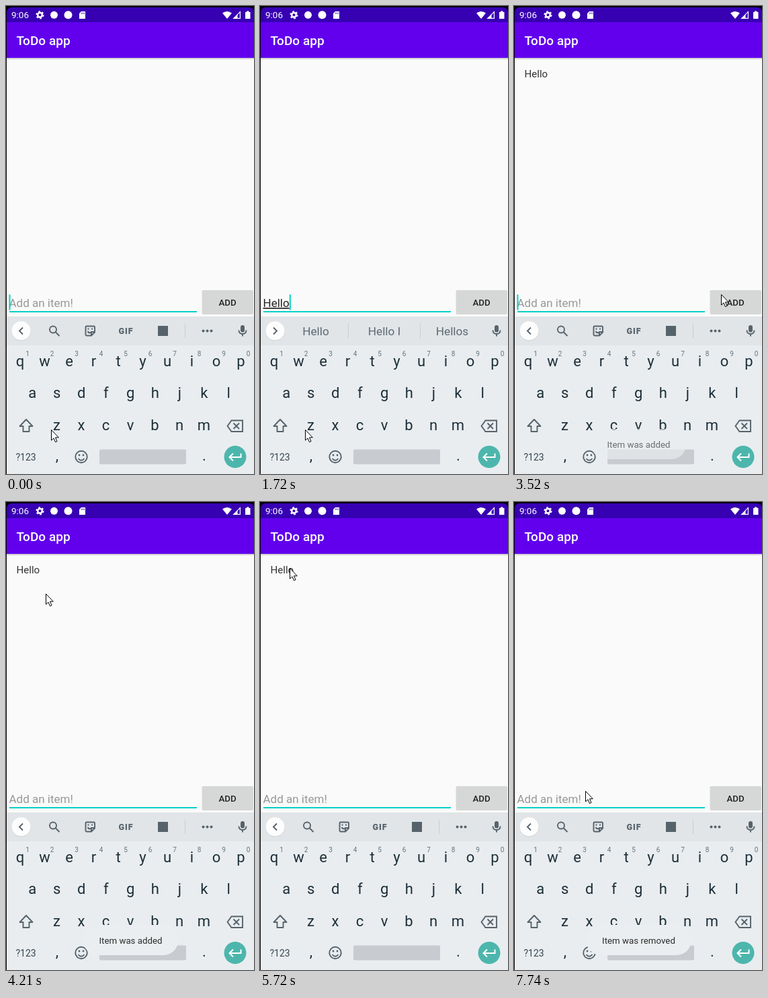
An HTML page that plays this animation: 369x695 px, repeating every 8000 ms.

```html
<!DOCTYPE html>
<html lang="en">
<head>
<meta charset="utf-8">
<title>To-do list demo</title>
<style>
  html, body { margin: 0; width: 100%; height: 100%; overflow: hidden; background: #000; }
  svg { display: block; width: 369px; height: 695px; font-family: Roboto, sans-serif; }
  .mid { text-anchor: middle; }
  .key { font-size: 22px; fill: #1d2f38; }
  .num { font-size: 10px; fill: #66737a; }
  .word { font-size: 17.2px; fill: #5d6a72; }
  .line { fill: none; stroke: #56636a; stroke-width: 1.9; }
  .icon { fill: #56636a; }
  .split { stroke: #c9ced2; }
</style>
</head>
<body>
<svg viewBox="0 0 369 695">
  <defs>
    <linearGradient id="shade" x2="0" y2="1">
      <stop stop-color="#000" stop-opacity=".24"/><stop offset="1" stop-color="#000" stop-opacity="0"/>
    </linearGradient>
  </defs>

  <!-- Status bar and title -->
  <rect x="1" y="2" width="368" height="40" rx="7" fill="#3700b3"/>
  <rect x="1" y="77" width="368" height="618" fill="#fafafa"/>
  <rect x="1" y="24" width="368" height="53" fill="#6200ee"/>
  <rect x="1" y="77" width="368" height="3" fill="url(#shade)"/>
  <g fill="#fff">
    <text x="8" y="18" font-size="13.5">9:06</text>
    <circle cx="50.5" cy="13.3" r="3.3" fill="none" stroke="#fff" stroke-width="2.6"/>
    <circle cx="50.5" cy="13.3" r="5.2" fill="none" stroke="#fff" stroke-width="1.8" stroke-dasharray="2.7"/>
    <circle cx="71.5" cy="13.3" r="5.5"/>
    <circle cx="92.5" cy="13.3" r="6"/>
    <path d="M112 8H118V19H109V11Z"/>
    <path d="M112.5 9.5v2.5M114.5 9.5v2.5M116.5 9.5v2.5" stroke="#3700b3" stroke-width=".8"/>
    <path d="M322 10.5Q329 5.5 336 10.5L329 19Z"/>
    <path d="M338.7 18.4H348.4V8.6Z" fill="none" stroke="#fff" stroke-width="1.2"/>
    <path d="M338 19H344.5V12.5Z"/>
    <path d="M358 7.5h3.5V9H363.500V19H356V9h2Z"/>
    <text x="15.500" y="58" font-size="19" font-weight="500">ToDo app</text>
  </g>

  <text id="item" x="15.500" y="105.500" font-size="15.1" fill="#333">Hello</text>

  <!-- Input row -->
  <path d="M5 454H284" stroke="#03d0c4" stroke-width="2"/>
  <text id="hint" x="4.500" y="447" font-size="17" fill="#989898">Add an item!</text>
  <text id="typed" x="4.500" y="447" font-size="17" fill="#242424" text-decoration="underline"></text>
  <rect id="caret" y="428.500" width="2" height="23" fill="#03d0c4"/>
  <rect id="button" x="291.500" y="422" width="76.500" height="36" rx="2"/>
  <text class="mid" x="329.500" y="444.500" font-size="13.3" font-weight="500" fill="#242424">ADD</text>

  <!-- Keyboard -->
  <rect x="1" y="461" width="368" height="43" fill="#e1e5e8"/>
  <rect x="1" y="504" width="368" height="191" fill="#e9edf0"/>
  <circle cx="22.500" cy="483" r="14.300" fill="#cdd2d5"/>
  <circle cx="22.500" cy="482.300" r="14" fill="#fdfdfd"/>
  <path id="chevron" class="line"/>
  <g id="tools">
    <circle class="line" cx="70" cy="480.500" r="5"/>
    <path class="line" d="M73.500 484L79.500 490" stroke-width="2.300"/>
    <path class="line" d="M120 475.500H130.500Q132 475.500 132 477V484.500L127 489.500H120Q118.500 489.500 118.500 488V477Q118.500 475.500 120 475.500ZM132 484H127V489.500M121.500 483Q123 486 126 485" stroke-width="1.600"/>
    <path class="icon" d="M121.500 478.500h2v2h-2zM127 478.500h2v2h-2z"/>
    <text class="mid icon" x="178.500" y="486.500" font-size="12.500" font-weight="900" letter-spacing="1">GIF</text>
    <rect class="icon" x="226" y="475" width="15" height="15"/>
    <path class="split" d="M266.500 472V493"/>
    <g class="icon"><circle cx="293.500" cy="482.500" r="2"/><circle cx="299.500" cy="482.500" r="2"/><circle cx="305.500" cy="482.500" r="2"/></g>
  </g>
  <g id="words">
    <path class="split" d="M131.500 471V494M238.500 471V494"/>
    <text class="mid word" x="83" y="489"></text>
    <text class="mid word" x="185" y="489"></text>
    <text class="mid word" x="286" y="489"></text>
  </g>
  <rect class="icon" x="349" y="474" width="6" height="10.500" rx="3"/>
  <path class="line" d="M346.500 481.500Q346.500 487 352 487T357.500 481.500M352 487V490.500" stroke-width="1.600"/>
  <g id="keys"></g>
  <path class="line" d="M30 614L39.500 624H34.500V632H25.500V624H20.500Z" stroke-linejoin="round"/>
  <path class="line" d="M335.500 615.500H352V632H335.500L329.500 623.750ZM338.500 619.500L347 628M347 619.500L338.500 628"/>
  <text x="14.500" y="674.500" font-size="14" fill="#37474f">?123</text>
  <text class="mid key" x="76" y="675" font-size="20">,</text>
  <text class="mid key" x="295" y="675" font-size="20">.</text>
  <circle class="line" cx="112" cy="669.500" r="8.700"/>
  <path class="line" d="M107.500 672Q112 677.500 116.500 672"/>
  <g class="icon"><circle cx="109" cy="667" r="1.400"/><circle cx="115" cy="667" r="1.400"/></g>
  <rect x="139" y="658.500" width="129" height="22" rx="2" fill="#c8ccd0"/>
  <circle cx="341" cy="669.500" r="16.500" fill="#4db6ac"/>
  <path d="M349.500 664.500V670H333M338 664.500L332.500 670L338 675.500" fill="none" stroke="#fff" stroke-width="2"/>

  <g id="toast">
    <rect y="628" height="45" rx="22.500" fill="#ebeef0"/>
    <text class="mid" x="185.500" y="656" font-size="13.300" fill="#2c2c2c"></text>
  </g>
  <path id="pointer" d="M.5 .5V16L4 12.800L6.500 18.600L9 17.500L6.500 11.800H11.300Z" fill="#fff" stroke="#000"/>
</svg>

<script>
const el = id => document.getElementById(id);
const show = (node, on) => node.style.display = on ? '' : 'none';
const LOOP = 8000, ADDED = 3400, REMOVED = 6250;

const addKeys = (letters, x, y) => [...letters].map((letter, i) => {
  const cx = x + i * 36.5;
  const digit = y < 540 ? `<text class="mid num" x="${cx + 11}" y="519.5">${(i + 1) % 10}</text>` : '';
  return `<text class="mid key" x="${cx}" y="${y}">${letter}</text>${digit}`;
}).join('');
el('keys').innerHTML = addKeys('qwertyuiop', 21, 535) + addKeys('asdfghjkl', 39.3, 582) + addKeys('zxcvbnm', 75.5, 629.5);

const typing = [1210, 1330, 1480, 1600, 1720];
const suggestions = [
  ['H', 'Hi', 'How'], ['He', 'Hey', 'Her'], ['Hel', 'Hello', 'Help'],
  ['Hell', 'Hello', 'Hells'], ['Hello', 'Hello I', 'Hellos']
];
const caretOn = [[0, 250], [810, 2220], [2740, 3160], [3280, 3790], [4360, 4720], [5240, 5720], [6250, 6670], [7210, 7740]];

// Pointer positions, each held until the next: time, x, y
const moves = [
  [0, 67, 629], [2620, 200, 530], [2740, 300, 445], [2890, 309, 430], [3010, 314, 432],
  [3160, 315, 433], [3520, 308, 428], [3670, 245, 355], [3790, 161, 263], [3940, 100, 195],
  [4060, 65, 147], [4210, 59, 136], [4360, 57, 130], [4480, 53, 117], [4600, 48, 106],
  [4720, 46, 101], [4870, 45, 99], [4990, 44, 98], [6520, 60, 134], [6670, 80, 235],
  [6790, 98, 340], [6910, 110, 409], [7060, 109, 428], [7210, 106, 429]
];

const ramp = (t, start) => Math.ceil(Math.min(1, Math.max(0, (t - start) / 360)) * 3) / 3;

const toasts = [
  { text: 'Item was added', width: 142, start: ADDED, end: 5240 },
  { text: 'Item was removed', width: 157, start: REMOVED, end: LOOP + 1 }
];

function draw(t) {
  const count = t < ADDED ? typing.filter(time => t >= time).length : 0;
  const typed = el('typed');
  typed.textContent = 'Hello'.slice(0, count);
  show(el('hint'), !count);
  show(el('tools'), !count);
  show(el('words'), count);
  if (count) el('words').querySelectorAll('text').forEach((word, i) => word.textContent = suggestions[count - 1][i]);
  el('chevron').setAttribute('d', count ? 'M20 477.500L25 482.500L20 487.500' : 'M25 477.500L20 482.500L25 487.500');

  el('caret').setAttribute('x', count ? 4.7 + typed.getComputedTextLength() : 4.5);
  show(el('caret'), caretOn.some(([from, to]) => t >= from && t < to));
  show(el('item'), t >= ADDED && t < REMOVED);
  el('button').setAttribute('fill', t >= 3280 && t < 3520 ? '#c5c6c6' : '#d6d7d7');

  const { text, width, start, end } = toasts[t < REMOVED ? 0 : 1];
  const [box, label] = el('toast').children;
  box.setAttribute('x', 185.5 - width / 2);
  box.setAttribute('width', width);
  label.textContent = text;
  el('toast').setAttribute('opacity', ramp(t, start) - ramp(t, end));

  const [, x, y] = moves.findLast(move => t >= move[0]);
  el('pointer').setAttribute('transform', `translate(${x} ${y})`);
}

const began = performance.now();
function tick() {
  draw((performance.now() - began) % LOOP);
  requestAnimationFrame(tick);
}
tick();
</script>
</body>
</html>
```
